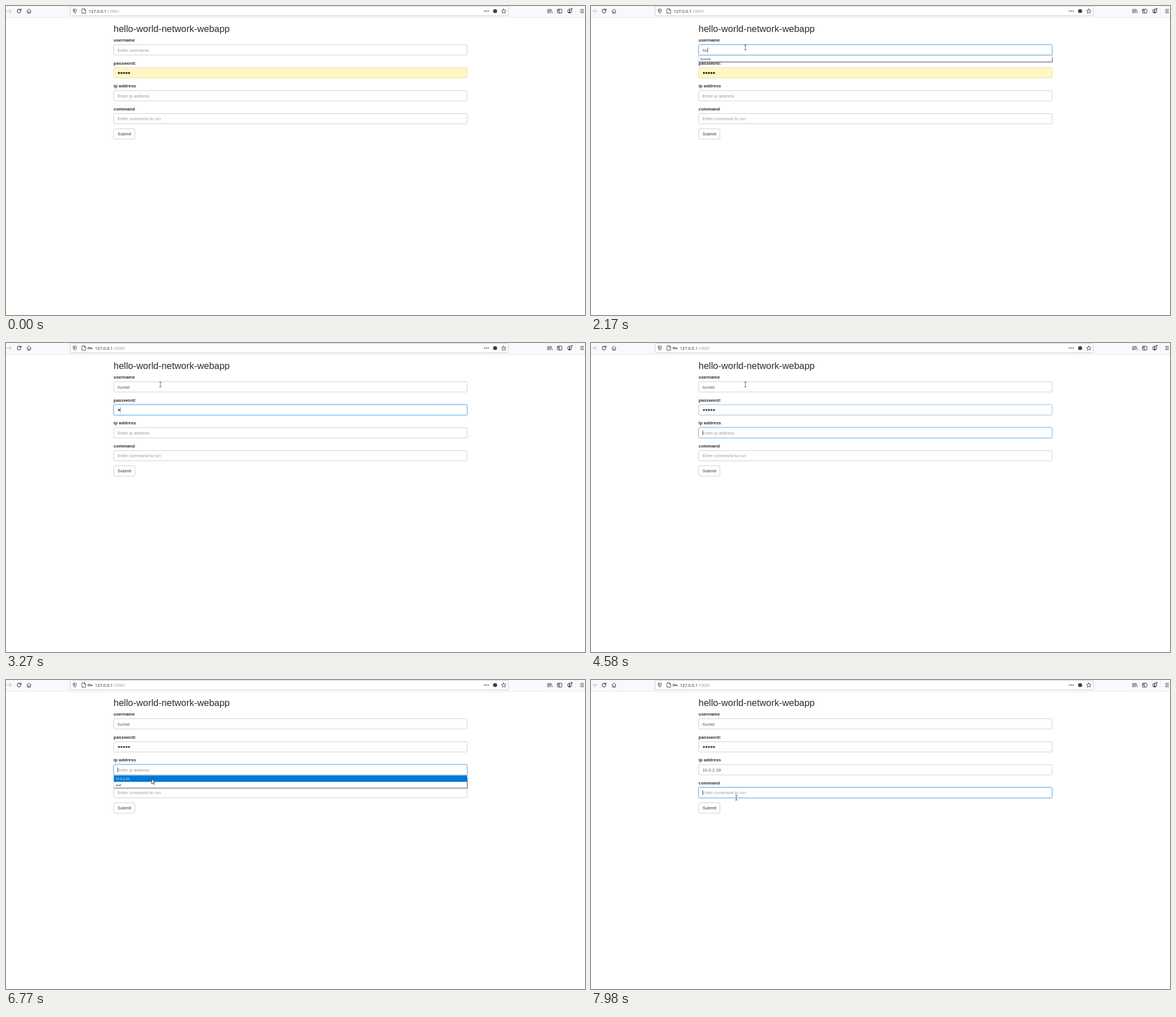
Recreate the animation shown at these times as an HTML page. Size 1024 by 547 pixels, loop 8000 ms.

```html
<!DOCTYPE html>
<html lang="en">
<head>
<meta charset="utf-8">
<title>hello-world-network-webapp</title>
<style>
  html, body { margin: 0; width: 100%; height: 100%; overflow: hidden; background: #fff; }
  svg { display: block; width: 100vw; height: 100vh; }
  text { font: 7.75px "Liberation Sans", Arial, sans-serif; fill: #333; white-space: pre; }
  .title { font-size: 16.43px; fill: #2b2b2b; }
  .label { font-size: 7.95px; font-weight: bold; fill: #2b2b2b; }
  .value { fill: #555; }
  .hint { fill: #999; }
  .url { font: 7.4px "Open Sans", "Noto Sans", sans-serif; fill: #1c1c20; }
  .port { fill: #8c8c90; }
  .item { font: 5.8px "Open Sans", "Noto Sans", sans-serif; fill: #111; }
  .icon { fill: none; stroke: #3f3f44; stroke-width: 1; stroke-linecap: round; stroke-linejoin: round; }
</style>
</head>
<body>
<svg viewBox="0 0 1024 547" preserveAspectRatio="none">
  <rect width="1024" height="20" fill="#f9f9fb"/>
  <path d="M0 20.3H1024" stroke="#e3e3e6" stroke-width=".8"/>
  <rect x="113.5" y=".5" width="775" height="16.6" rx="1" fill="#fff" stroke="#cbcbd0" stroke-width=".9"/>
  <g class="icon">
    <path d="M1 9H9.5M6 5.5L9.5 9L6 12.5" stroke="#b9b9bd"/>
    <path d="M26.2 10.2A3.3 3.3 0 1 1 25.6 6.7M26.7 5.2V8H23.8" stroke-width="1.1"/>
    <path d="M36.8 9L40.6 5.3L44.4 9M38 8.6V12.6H43.2V8.6M40.6 12.4V10"/>
    <path d="M121.7 5.3L124.6 6.3C124.7 9.5 123.8 11.6 121.7 12.8C119.6 11.6 118.7 9.5 118.8 6.3Z" stroke-width=".9"/>
    <path d="M121.7 7.2V10.8C120.7 10 120.4 9 120.4 7.6Z" fill="#3f3f44" stroke-width=".4"/>
    <path d="M134.6 5H138.7L140.9 7.2V12.8H134.6ZM138.5 5V7.4H140.9" stroke-width=".9"/>
    <path d="M880.3 5L881.5 7.7L884.4 8L882.2 9.9L882.9 12.8L880.3 11.3L877.7 12.8L878.4 9.9L876.2 8L879.1 7.7Z" stroke-width=".9"/>
    <path d="M958 5.7V12.3M960.2 5.7V12.3M962.4 5.7V12.3M964 6L966 12.3"/>
    <rect x="975.2" y="5.7" width="8" height="6.8" rx="1"/>
    <path d="M978.4 6V12.3M976.4 7.6H977.2M976.4 9.2H977.2"/>
    <circle cx="996.8" cy="9" r="3.7" stroke-width=".9"/>
    <path d="M1016 6.2H1021.6M1016 9H1021.6M1016 11.8H1021.6"/>
  </g>
  <g fill="#3f3f44">
    <circle cx="846.3" cy="9" r="1"/><circle cx="849.5" cy="9" r="1"/><circle cx="852.7" cy="9" r="1"/>
    <circle cx="865" cy="9" r="3.6"/>
    <circle cx="996.8" cy="8" r="1.4"/><path d="M994.2 11.2Q996.8 8.8 999.4 11.2Q996.8 13.2 994.2 11.2"/>
  </g>
  <circle cx="1000.4" cy="5" r="1.8" fill="#1e9bf0"/>
  <path d="M1007.5 0V17" stroke="#ebebee" stroke-width=".8"/>
  <g id="key" class="icon">
    <circle cx="146.5" cy="9" r="1.7"/><path d="M148.3 9H152.6V10.6M150.8 9V10.3"/>
  </g>
  <text id="url" class="url" y="11.7">127.0.0.1<tspan class="port">:10001</tspan></text>

  <text class="title" x="190.3" y="46">hello-world-network-webapp</text>
  <g id="form"></g>
  <rect x="190.5" y="217.4" width="37.5" height="18.2" rx="2" fill="#fff" stroke="#ccc" stroke-width=".9"/>
  <text x="197.3" y="229.2">Submit</text>

  <rect id="selection" x="197.3" y="113.8" width="22.4" height="9.6" fill="#0078d7"/>
  <g id="dots"></g>
  <rect id="caret" width=".7" height="9" fill="#333"/>

  <g id="popup">
    <rect id="sheet" x="190.4" width="625.2" fill="#fff" stroke="#b4b4bc" stroke-width=".7"/>
    <path id="shade" fill="none" stroke="#72727e" stroke-width="1.3"/>
    <rect id="row" x="191" width="624.4" height="11.2" fill="#0078d7"/>
    <text id="item0" class="item" x="193.8"></text>
    <text id="item1" class="item" x="193.8"></text>
  </g>

  <g id="mouse">
    <circle id="press" r="6.4" fill="#ffe100" fill-opacity=".55"/>
    <path id="beam" class="icon" style="stroke-width:.8"
      d="M-1.8 -4.3H-.5L0 -3.9L.5 -4.3H1.8M0 -3.9V3.9M-1.8 4.3H-.5L0 3.9L.5 4.3H1.8"/>
    <path id="arrow" d="M0 0V8.6L2 6.8L3.3 9.9L4.7 9.3L3.4 6.3H6Z" fill="#fff" stroke="#111" stroke-width=".7"/>
  </g>
</svg>
<script>
(() => {
  const NS = 'http://www.w3.org/2000/svg';
  const LOOP = 8000, LEFT = 197.3, USER = 'humid', HOST = '10.0.2.33';
  const $ = id => document.getElementById(id);
  const set = (el, attrs) => { for (const k in attrs) el.setAttribute(k, attrs[k]); return el; };
  const add = (parent, tag, attrs) => parent.appendChild(set(document.createElementNS(NS, tag), attrs));
  const show = (el, on) => el.setAttribute('visibility', on ? 'inherit' : 'hidden');
  const within = (t, spans) => spans.some(([a, b]) => t >= a && t < b);
  const count = (t, times) => times.filter(x => t >= x).length;
  const fieldTop = i => 68.6 + 40.6 * i;
  const mix = (a, b, k) => `rgb(${a.map((v, i) => Math.round(v + (b[i] - v) * k))})`;

  const fields = [
    ['username', 'Enter username'],
    ['password:', ''],
    ['ip address', 'Enter ip address'],
    ['command', 'Enter command to run']
  ].map(([label, hint], i) => {
    const y = fieldTop(i), form = $('form');
    add(form, 'text', { class: 'label', x: 190.3, y: y - 5.5 }).textContent = label;
    const box = add(form, 'rect', { x: 190.5, y, width: 625, height: 18.2, rx: 2, 'stroke-width': .9 });
    const text = add(form, 'text', { x: LEFT, y: y + 11.9 });
    return { hint, box, text };
  });
  const dots = [0, 1, 2, 3, 4].map(i => add($('dots'), 'circle', { cx: 199.7 + 4.45 * i, cy: 118.6, r: 1.8 }));

  // Focus start and end for each field
  const focusSpans = [[870, 2820], [2820, 4580], [4580, 7760], [7760, LOOP + 500]];
  const userKeys = [2060, 2170, 2280, 2390, 2500];
  const passKeys = [3270, 3380, 3490, 3490, 3810];
  const presses = [[870, 1090], [5780, 6000], [7210, 7430], [7760, 7980]];
  const carets = [[870, 1400], [1950, 2820], [3270, 4360], [4580, 5020], [5560, 6100], [6540, 6990], [7320, LOOP]];
  const picked = 7320;

  // Pointer stops: time, x, y
  const stops = [
    [100, 904, 515], [210, 772, 424], [320, 585, 292], [430, 402, 164], [540, 300, 92], [640, 273, 73.4],
    [5450, 272, 80], [5560, 268, 106], [5670, 262, 143], [5780, 260, 155],
    [6430, 260, 157], [6540, 259, 163], [6650, 258, 170], [6760, 257.5, 175], [6870, 257, 177], [6990, 257, 178],
    [7430, 257, 184], [7540, 257, 196], [7650, 257, 206], [7980, 257, 208.2]
  ];

  function level(t, [from, to]) {
    if (t < from) return 0;
    if (t < to) return t < from + 110 ? .75 : 1;
    return t < to + 110 ? .35 : 0;
  }

  function drawFields(t) {
    const typed = USER.slice(0, count(t, userKeys));
    const values = [typed, '', t >= picked ? HOST : '', ''];
    const filled = t < passKeys[0];
    fields.forEach(({ hint, box, text }, i) => {
      const k = level(t, focusSpans[i]), yellow = i === 1 && filled;
      set(box, {
        fill: yellow ? '#fff7c4' : '#fff',
        stroke: mix(yellow ? [229, 220, 172] : [204, 204, 204], [102, 175, 233], k)
      });
      box.style.filter = k ? `drop-shadow(0 0 1.8px rgba(102,175,233,${.75 * k}))` : 'none';
      text.textContent = values[i] || hint;
      text.setAttribute('class', values[i] ? 'value' : 'hint');
    });

    const selected = t >= focusSpans[1][0] && filled;
    const n = filled ? 5 : count(t, passKeys);
    show($('selection'), selected);
    dots.forEach((d, i) => {
      show(d, i < n);
      d.setAttribute('fill', selected ? '#fff' : filled ? '#2b2b2b' : '#4c4c4c');
    });

    const active = focusSpans.findIndex(span => within(t, [span]));
    show($('caret'), within(t, carets) && active >= 0);
    if (active >= 0) {
      const width = active === 1 ? 4.45 * n : values[active] ? fields[active].text.getComputedTextLength() + .4 : 0;
      set($('caret'), { x: LEFT + width, y: fieldTop(active) + 4.7 });
    }
    show($('key'), !filled);
    $('url').setAttribute('x', filled ? 146.4 : 157.4);
  }

  function drawPopup(t) {
    const names = within(t, [[2060, 2610]]) ? [USER] : within(t, [[5890, picked]]) ? [HOST, 'asd'] : [];
    show($('popup'), names.length);
    if (!names.length) return;
    const y = fieldTop(names.length === 1 ? 0 : 2) + 18.8, h = 11.1 * names.length + .6;
    const lit = t >= 6650 && names.length > 1;
    set($('sheet'), { y, height: h });
    $('shade').setAttribute('d', `M191 ${y + h}H815.8V${y + 4}`);
    set($('row'), { y: y + .5 });
    show($('row'), lit);
    [0, 1].forEach(i => {
      const item = $('item' + i);
      item.textContent = names[i] || '';
      item.setAttribute('y', y + 8.3 + 11 * i);
      item.style.fill = lit && !i ? '#fff' : '#111';
    });
  }

  function drawMouse(t) {
    const at = stops[count(t, stops.map(s => s[0])) - 1];
    show($('mouse'), at);
    if (!at) return;
    const [, x, y] = at;
    const overField = x > 190 && x < 816 && fields.some((f, i) => y >= fieldTop(i) && y <= fieldTop(i) + 18.2);
    $('mouse').setAttribute('transform', `translate(${x} ${y})`);
    show($('beam'), overField);
    show($('arrow'), !overField);
    show($('press'), within(t, presses));
  }

  function frame(now) {
    const t = now % LOOP;
    drawFields(t);
    drawPopup(t);
    drawMouse(t);
    requestAnimationFrame(frame);
  }
  frame(0);
})();
</script>
</body>
</html>
```
